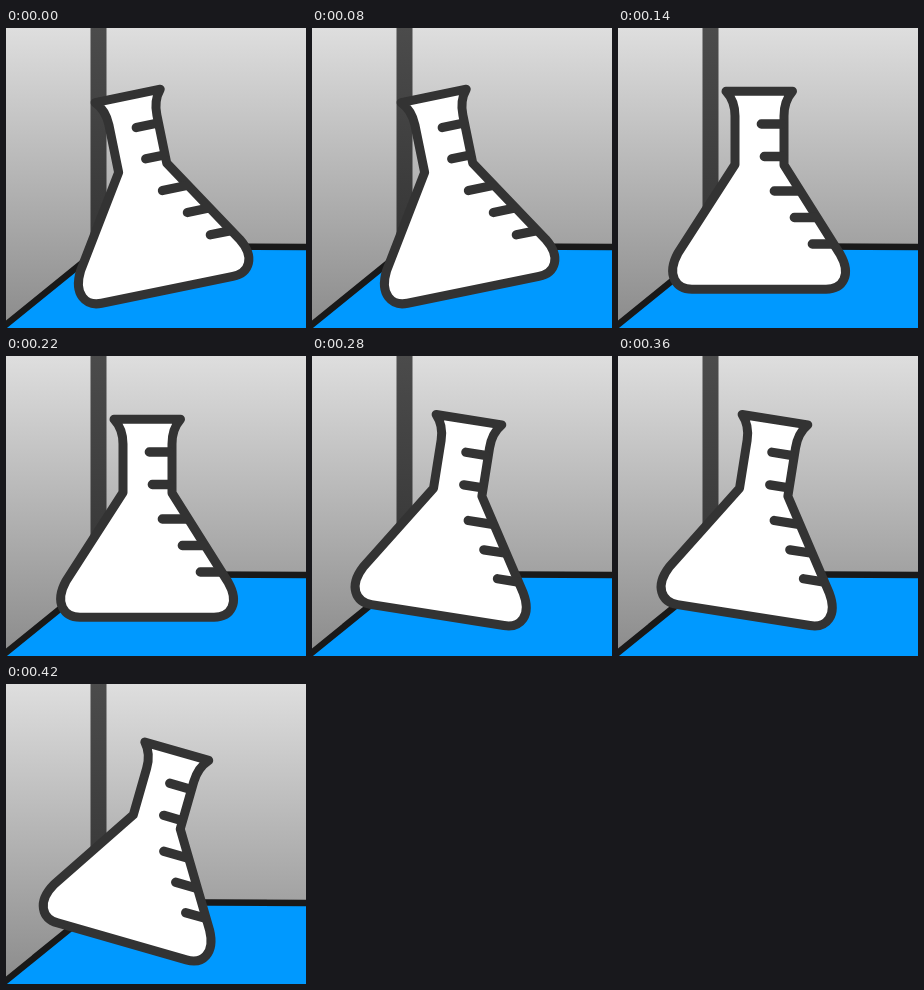
An HTML page for the animation above (0.56 s loop, 300 px wide and 300 px high).

```html
<!DOCTYPE html>
<html lang="en">
<head>
<meta charset="utf-8">
<title>Rocking flask</title>
<style>
  html, body { margin: 0; height: 100%; overflow: hidden; }
  svg { display: block; width: 100%; height: 100%; }
</style>
</head>
<body>
<svg viewBox="0 0 300 300">
  <defs>
    <linearGradient id="wall" x2="0" y2="1">
      <stop stop-color="#dedede"/>
      <stop offset="1" stop-color="#8b8b8b"/>
    </linearGradient>
    <linearGradient id="post" x2="0" y2="1">
      <stop stop-color="#4b4b4b"/>
      <stop offset="1" stop-color="#363636"/>
    </linearGradient>
  </defs>
  <rect width="300" height="300" fill="url(#wall)"/>
  <rect x="84.500" width="16" height="222" fill="url(#post)"/>
  <path d="M-10 304.700L97 218L310 219V315H-10Z" fill="#09f" stroke="#191919" stroke-width="6.500"/>
  <g id="flask" stroke="#333" stroke-width="9" stroke-linecap="round" stroke-linejoin="round">
    <path fill="#fff" d="M108 63.300H174.500Q166 73 166 88V137L222 226C234 247 225 261.200 208 261.200H74C58 261.200 48 247 60 225L117 136.500V88Q117 73 108 63.300Z"/>
    <path stroke-width="9.300" d="M143.300 96H163M146.300 128.500H164M156.300 163H181M176.300 189.500H197M194.300 216H214"/>
  </g>
</svg>
<script>
  const flask = document.getElementById("flask");
  const STEP = 140;
  // Each pose: tilt in degrees, then a small shift
  const poses = [[-11.6, 0.3, 0.8], [0, 0, 0], [9, 0, 0.5], [16, 1.7, 2.5]];

  function draw(now) {
    const [tilt, dx, dy] = poses[Math.floor(now / STEP) % poses.length];
    flask.setAttribute("transform", `translate(${dx} ${dy}) rotate(${tilt} 150 163)`);
  }

  const start = performance.now();
  function tick() {
    draw(performance.now() - start);
    requestAnimationFrame(tick);
  }
  tick();
</script>
</body>
</html>
```
